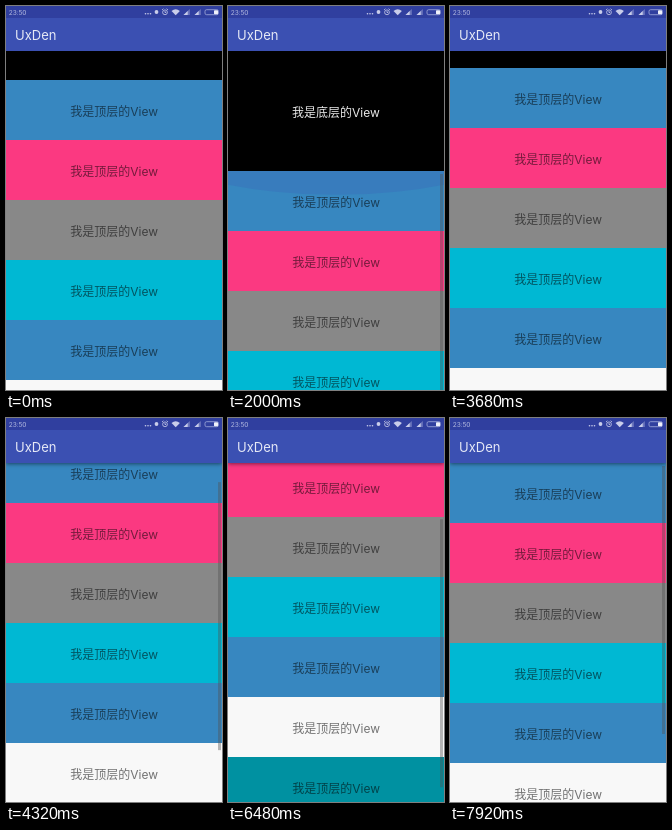
Recreate the animation shown at these times as an HTML page. Size 216 px wide and 384 px high, loop 8000 ms.

```html
<!DOCTYPE html>
<html lang="zh-CN">
<head>
<meta charset="utf-8">
<title>Layered scroll</title>
<style>
/* Integers keep the layer edges on whole pixels */
@property --drag {
  syntax: "<integer>";
  inherits: true;
  initial-value: 45;
}
@property --scroll {
  syntax: "<integer>";
  inherits: true;
  initial-value: 0;
}
html, body {
  margin: 0;
  width: 100%;
  height: 100%;
  overflow: hidden;
}
.stage {
  position: relative;
  width: 216px;
  height: 384px;
  overflow: hidden;
  background: #f8f8f8;
  font: 12px/64px Inter, "Noto Sans CJK SC", "Noto Sans CJK", sans-serif;
}
.stage * { box-sizing: border-box; }

/* Header */
.status, .bar { position: absolute; left: 0; width: 216px; }
.status { top: 0; height: 12px; background: #303f9f; z-index: 3; }
.status svg { display: block; }
.bar {
  top: 12px;
  height: 33px;
  padding-left: 9px;
  background: #3b50b2;
  color: #e6e9f6;
  font-size: 13px;
  line-height: 35px;
  box-shadow: 0 1px 4px rgba(0, 0, 0, .5);
  z-index: 2;
}

/* Layers */
.bottom {
  position: absolute;
  top: 45px;
  width: 216px;
  height: 120px;
  background: #000;
  color: #e8e8e8;
  line-height: 124px;
  text-align: center;
}
.panel {
  position: absolute;
  top: 0;
  width: 216px;
  height: 339px;
  overflow: hidden;
  background: #f8f8f8;
  transform: translateY(calc(var(--drag) * 1px));
  animation: drag 8s infinite linear, scroll 8s infinite linear;
}
.list { transform: translateY(calc(var(--scroll) * -1px)); }
.list div {
  height: 60px;
  padding-left: .5px;
  text-align: center;
  color: rgba(0, 0, 0, .54);
}
.blue { background: #3787c0; }
.pink { background: #fb3981; }
.gray { background: #888; }
.cyan { background: #00b8d3; }
.white { background: #f8f8f8; }
.teal { background: #0091a1; }

/* Thumb travel is the scroll times view height over content height */
.thumb {
  position: absolute;
  top: 3px;
  left: 212px;
  width: 2.5px;
  height: 268px;
  background: rgba(80, 80, 80, .4);
  transform: translateY(calc(var(--scroll) * .807px));
  animation: thumb 8s infinite linear;
}
.glow {
  position: absolute;
  top: 0;
  left: 0;
  transform-origin: 0 0;
  animation: glow 8s infinite linear;
}

@keyframes drag {
  0% { --drag: 74; animation-timing-function: cubic-bezier(.35, .4, .7, 1); }
  13%, 28.5% { --drag: 165; }
  46% { --drag: 62; }
  50%, 100% { --drag: 45; }
}
@keyframes scroll {
  0%, 50% { --scroll: 0; }
  54% { --scroll: 20; }
  65%, 78.5% { --scroll: 81; }
  88% { --scroll: 25; animation-timing-function: cubic-bezier(.3, .53, .6, 1); }
  95%, 100% { --scroll: 0; }
}
@keyframes thumb {
  0%, 15.9% { opacity: 0; }
  16%, 32% { opacity: 1; }
  35%, 49.9% { opacity: 0; }
  50%, 100% { opacity: 1; }
}
@keyframes glow {
  0%, 15.5% { transform: scaleY(0); opacity: 0; animation-timing-function: ease-out; }
  25%, 28.5% { transform: scaleY(.55); opacity: 1; }
  33%, 100% { transform: scaleY(0); opacity: 0; }
}
</style>
</head>
<body>
<div class="stage">
  <div class="bottom">我是底层的View</div>

  <div class="panel">
    <div class="list">
      <div class="blue">我是顶层的View</div>
      <div class="pink">我是顶层的View</div>
      <div class="gray">我是顶层的View</div>
      <div class="cyan">我是顶层的View</div>
      <div class="blue">我是顶层的View</div>
      <div class="white">我是顶层的View</div>
      <div class="teal">我是顶层的View</div>
    </div>
    <svg class="glow" width="216" height="44">
      <circle cx="108" cy="-280.6" r="324" fill="#3f51b5" fill-opacity=".2"/>
    </svg>
    <div class="thumb"></div>
  </div>

  <div class="bar">UxDen</div>

  <div class="status">
    <svg width="216" height="12" fill="#c9cdea">
      <text x="2.8" y="8.6" font-size="6.6" letter-spacing="-.1" fill="#b4bae0">23:50</text>
      <!-- More, link, alarm -->
      <circle cx="139.5" cy="7.8" r=".8"/>
      <circle cx="142" cy="7.8" r=".8"/>
      <circle cx="144.5" cy="7.8" r=".8"/>
      <circle cx="150.5" cy="6" r="1.9"/>
      <g fill="none" stroke="#c9cdea" stroke-width=".8">
        <circle cx="159" cy="6.3" r="2.4"/>
        <path d="M159 4.9v1.6h1.2M156 4l1.4-1.3M162 4l-1.4-1.3"/>
      </g>
      <!-- Wi-Fi -->
      <path d="M165.5 4.9q4.2-3.4 8.4 0l-4.2 4.3z"/>
      <!-- Signal -->
      <path d="M177.5 9h6.3V3z" fill-opacity=".4"/>
      <path d="M177.5 9h4.2V5z"/>
      <path d="M188.5 9h6.3V3z" fill-opacity=".4"/>
      <path d="M188.5 9h4.2V5z"/>
      <!-- Battery -->
      <rect x="199" y="3.7" width="13.4" height="5" rx="1.6" fill="none" stroke="#a3abdb" stroke-width=".8"/>
      <rect x="208" y="4.2" width="4" height="4" rx=".8" fill="#eef0fa"/>
    </svg>
  </div>
</div>
</body>
</html>
```
